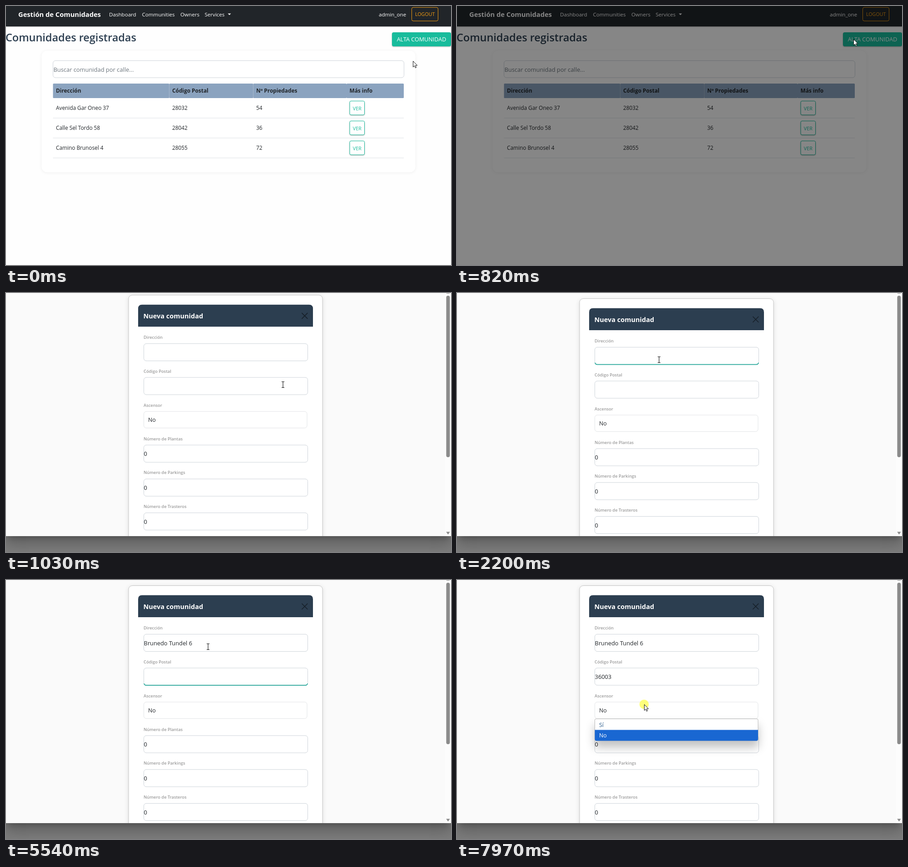
An HTML page for the animation above (8 s loop, 980 px wide and 571 px high).

```html
<!DOCTYPE html>
<html lang="es">
<head>
<meta charset="utf-8">
<title>Gestión de Comunidades</title>
<style>
  html, body { margin: 0; width: 100%; height: 100%; overflow: hidden; background: #fefefe; }
  svg, #dim, #pane { position: absolute; left: 0; top: 0; }
  #dim { width: 980px; height: 571px; background: #000; }
  #pane {
    width: 980px; height: 536px; background: #fafafa;
    box-shadow: 0 19px 30px 2px rgba(0,0,0,.14), 0 7px 36px 6px rgba(0,0,0,.12), 0 9px 12px -5px rgba(0,0,0,.2);
  }
  text { font-family: "Open Sans", "Noto Sans", sans-serif; white-space: pre; }
  .lift { filter: drop-shadow(0 1.5px 1.2px rgba(0,0,0,.3)); }
  .card { filter: drop-shadow(0 1px 3px rgba(0,0,0,.06)); }
  .dialog { filter: drop-shadow(0 2px 5px rgba(0,0,0,.12)); }
  .menu { filter: drop-shadow(0 14px 10px rgba(0,0,0,.24)); }
</style>
</head>
<body>
<svg id="page" width="980" height="571"></svg>
<div id="dim"></div>
<div id="pane"><svg id="form" width="980" height="536"></svg></div>
<svg id="top" width="980" height="571"></svg>
<script>
const INK = '#212529', TEAL = '#18bc9c', ORANGE = '#f39c12', GREY = '#8b8b8b';
const $ = id => document.getElementById(id);

const text = (x, y, size, str, fill = INK, weight = 400, more = '') =>
  `<text x="${x}" y="${y}" font-size="${size}" font-weight="${weight}" fill="${fill}" ${more}>${str}</text>`;
const rect = (x, y, w, h, r, fill, stroke = 'none', more = '') =>
  `<rect x="${x}" y="${y}" width="${w}" height="${h}" rx="${r}" fill="${fill}" stroke="${stroke}" ${more}/>`;
const path = (d, fill, more = '') => `<path d="${d}" fill="${fill}" ${more}/>`;
const centred = 'text-anchor="middle"', lift = 'class="lift"';

// Community list
const cols = [103.5, 359.5, 544.5, 750, 876];
const heads = ['Dirección', 'Código Postal', 'Nº Propiedades', 'Más info'];
const rows = [
  ['Avenida Gar Oneo 37', '28032', '54'],
  ['Calle Sel Tordo 58', '28042', '36'],
  ['Camino Brunosel 4', '28055', '72']
];
const menu = [[227, 'Dashboard'], [299.5, 'Communities'], [384, 'Owners'], [437.5, 'Services']];

$('page').innerHTML =
  rect(0, 0, 980, 571, 0, '#fefefe') +
  rect(0, 0, 980, 45, 0, INK, 'none', lift) +
  text(27, 24, 14.7, 'Gestión de Comunidades', '#fff', 700) +
  menu.map(([x, s]) => text(x, 23, 11.6, s, '#fff')).join('') +
  path('M488.5 16.5h7l-3.5 3.6z', '#fff') +
  text(821, 23, 11.6, 'admin_one', '#fff') +
  rect(893.5, 3, 58, 30, 3.5, 'none', ORANGE) +
  text(922.7, 22.3, 10.7, 'LOGOUT', ORANGE, 400, centred) +
  text(-1, 77.5, 23.45, 'Comunidades registradas', '#2c3e50', 600) +
  rect(850, 58, 130, 31, 4, TEAL, 'none', lift) +
  text(915, 78, 12.6, 'ALTA COMUNIDAD', '#fff', 400, centred) +
  rect(78.5, 98.5, 823, 268, 12, '#fff', 'none', 'class="card"') +
  rect(103.5, 120.5, 773, 37.5, 5.5, '#fff', '#ced4da') +
  text(104.5, 145, 12.87, 'Buscar comunidad por calle...', '#6c757d') +
  heads.map((s, i) => rect(cols[i], 171, cols[i + 1] - cols[i], 32, 1.6, '#8ba3bf') +
    text(cols[i] + 6.5, 191, 11.85, s, INK, 700)).join('') +
  rows.map((cells, r) => {
    const y = r * 44;
    return cells.map((s, i) => text(cols[i] + 6.5, 228.7 + y, 11.8, s)).join('') +
      rect(103.5, 246.5 + y, 772.5, 1, 0, '#dee2e6') +
      rect(757, 209.5 + y, 32.5, 30.5, 3, '#fff', TEAL, lift) +
      text(773.3, 229.5 + y, 10.7, 'VER', TEAL, 400, centred);
  }).join('');

// New community form
const field = (y, w = 361, h = 38, stroke = '#ced4da') => rect(303.5, y, w, h, 5.5, '#fff', stroke);
const label = (y, s) => text(303, y, 9.3, s, '#9a9a9a', 600);
const underline = (id, y) => path(
  `M304 ${y - 4}Q304.7 ${y} 309 ${y}H659Q663.3 ${y} 664 ${y - 4}`, 'none',
  `id="${id}" stroke="#26a69a" stroke-width="1.8"`);
const input = (id, y) => field(y) + underline(id + 'Line', y + 38.2) +
  text(303.6, y + 24.2, 12.8, '', INK, 400, `id="${id}"`) +
  rect(304, y + 9.5, 1, 18, 0, INK, 'none', `id="${id}Caret"`);
const counter = (y, s) => label(y - 10.5, s) + field(y) + text(303.6, y + 24.2, 12.8, '0');

$('form').innerHTML = '<g id="dialog">' +
  rect(270, 12.5, 427, 640, 8, '#fff', '#c4c4c4', 'class="dialog"') +
  path('M291 82V42Q291 33.5 299.5 33.5H667.5Q676 33.5 676 42V82Z', '#2c3e50') +
  text(302.5, 64, 14.5, 'Nueva comunidad', '#fff', 700) +
  path('M651.8 52.2l12 12m0-12l-12 12', 'none', 'stroke="#161f28" stroke-width="1.5" stroke-linecap="round"') +
  label(108.7, 'Dirección') + input('street', 119.5) +
  label(184, 'Código Postal') + input('zip', 194) +
  label(258.5, 'Ascensor') + field(269, 359.5, 36.5, '#e2e4e6') + text(313, 291.7, 12.4, 'No') +
  counter(343, 'Número de Plantas') +
  counter(417.8, 'Número de Parkings') +
  counter(492.5, 'Número de Trasteros') +
  label(557, 'Acceso Movilidad Reducida') +
  '</g>' +
  rect(967, 0, 13, 536, 0, '#fcfcfc') +
  rect(969.5, 6, 8, 356, 4, GREY) +
  path('M969.5 1h8l-.8-1h-6.4zM969.3 526.5h8.4l-4.2 6z', GREY);

$('top').innerHTML = '<g id="list">' +
  rect(303.5, 306, 359.5, 48.5, 3, '#fff', '#b8b8b8', 'class="menu"') +
  path('M303.5 330.5H663V350.5Q663 354.5 659 354.5H307.5Q303.5 354.5 303.5 350.5Z', '#1967d2') +
  text(313, 323.5, 12.4, 'Sí', '#2b5d8c') + text(313, 347.3, 12.4, 'No', '#fff') +
  '<circle cx="412" cy="274" r="10.3" fill="#ffff50" fill-opacity=".75"/></g>' +
  '<g id="pointer">' +
  path('M.5.5V13.6L3.5 10.8 5.5 15.4 7.6 14.5 5.6 10H9.7Z', '#fff', 'id="arrow" stroke="#111" stroke-width="1"') +
  path('M-3-6.5H-1Q0-6.5 0-5.5Q0-6.5 1-6.5H3M0-5.5V5.5M-3 6.5H-1Q0 6.5 0 5.5Q0 6.5 1 6.5H3', 'none',
    'id="beam" stroke="#111" stroke-width="1.1"') +
  '</g>';

// Timeline, in ms
const LOOP = 8000, BLINK = 530;
const inputs = [
  { id: 'street', value: 'Brunedo Tundel 6', focus: 1670, blur: 4980,
    keys: [2340, 2470, 2600, 2730, 2730, 2930, 3030, 3130, 3330, 3400, 3600, 3690, 3770, 3860, 4480, 4590] },
  { id: 'zip', value: '36003', focus: 5000, blur: 7600, keys: [6010, 6280, 6540, 6740, 6870] }
];
const track = [
  [60, 896, 121], [350, 873, 73], [890, 873, 73], [1030, 610, 202], [1380, 474, 186],
  [1640, 445, 147], [7230, 445, 147], [7480, 413, 270], [7600, 413, 270], [7830, 412, 274]
];

const ramp = (t, start, span) => Math.min(1, Math.max(0, (t - start) / span));
const smooth = p => p * p * (3 - 2 * p);
const easeOut = p => 1 - (1 - p) ** 1.75;
const show = (id, on) => $(id).setAttribute('visibility', on ? 'visible' : 'hidden');

function pointerAt(t) {
  const i = track.findIndex(k => k[0] > t);
  if (i === 0) return track[0].slice(1);
  if (i < 0) return track[track.length - 1].slice(1);
  const [t0, x0, y0] = track[i - 1], [t1, x1, y1] = track[i];
  const p = (t - t0) / (t1 - t0);
  return [x0 + (x1 - x0) * p, y0 + (y1 - y0) * p];
}

function drawInput({ id, value, focus, blur, keys }, t) {
  const typed = keys.filter(k => k <= t);
  const last = typed.length ? typed[typed.length - 1] : focus;
  const node = $(id);
  node.textContent = value.slice(0, typed.length);
  const width = typed.length ? node.getComputedTextLength() : 0;
  $(id + 'Caret').setAttribute('x', Math.round(304 + width));
  show(id + 'Caret', t >= focus && t < blur && (t - last) % (2 * BLINK) < BLINK);
  $(id + 'Line').setAttribute('opacity', smooth(ramp(t, focus, 300)) - smooth(ramp(t, blur, 250)));
}

function draw(now) {
  const t = now % LOOP;
  $('dim').style.opacity = .5 * ramp(t, 678, 150);
  $('pane').style.opacity = ramp(t, 848, 150);
  $('dialog').setAttribute('transform', `translate(0 ${-39 * (1 - easeOut(ramp(t, 850, 300)))})`);
  inputs.forEach(f => drawInput(f, t));

  const [x, y] = pointerAt(t), beam = t > 1000 && t < 7340;
  $('pointer').setAttribute('transform', `translate(${Math.round(x)} ${Math.round(y)})`);
  show('beam', beam);
  show('arrow', !beam);
  show('list', t >= 7970);
}

let start;
function tick(now) {
  start ??= now;
  draw(now - start);
  requestAnimationFrame(tick);
}
draw(0);
requestAnimationFrame(tick);
</script>
</body>
</html>
```
